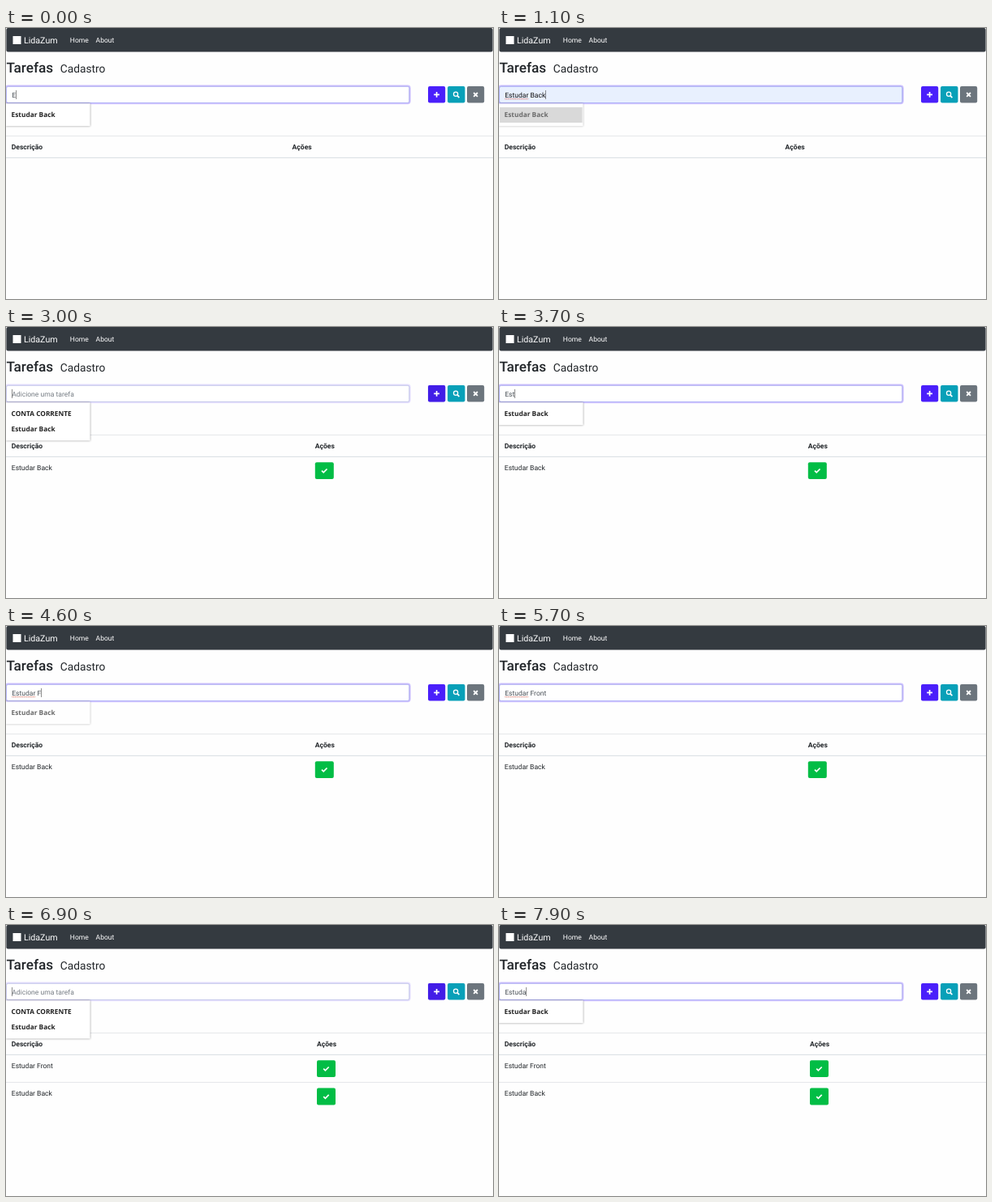
An HTML page for the animation above (8000 ms loop, 600 by 335 pixels).

```html
<!DOCTYPE html>
<html lang="pt">
<head>
<meta charset="utf-8">
<title>Tarefas</title>
<style>
html, body { margin: 0; width: 100%; height: 100%; overflow: hidden; background: #fefefe; }
svg { display: block; width: 600px; height: 335px; }
text { font: 8.55px Roboto, sans-serif; fill: #212529; white-space: pre; text-rendering: geometricPrecision; }
.nav { fill: #fff; }
.brand { font-size: 10.65px; }
.title { font-size: 17.2px; font-weight: 500; }
.sub { font-size: 13.75px; }
.head { font-weight: 700; }
.hint { fill: #757c83; }
.option { font: 600 8.3px "Noto Sans", sans-serif; fill: #222; }
.icon { fill: none; stroke: #fff; stroke-width: 1.7; }
.rule { stroke: #e5e7ea; }
.rule.strong { stroke: #dee2e6; stroke-width: 1.2; }
#popup { filter: drop-shadow(0 .7px .8px #0007); }
</style>
</head>
<body>
<svg viewBox="0 0 600 335">
  <defs>
    <g id="done">
      <rect width="23" height="20.8" rx="2" fill="#02bd45"/>
      <path class="icon" d="M8.2 10.5l2.2 2.2 4.3-4.4"/>
    </g>
  </defs>
  <rect x=".4" width="599.2" height="29.4" rx="2" fill="#343a40"/>
  <rect x="8.5" y="10" width="10" height="10" fill="#fff"/>
  <text class="nav brand" x="22" y="18.7">LidaZum</text>
  <text class="nav" x="78.8" y="18">Home</text>
  <text class="nav" x="110.6" y="18">About</text>
  <text class="title" x=".5" y="55.2">Tarefas</text>
  <text class="sub" x="66.8" y="55.2">Cadastro</text>

  <rect x=".5" y="72.3" width="496.3" height="20.2" rx="2" fill="#fff" stroke="#ced4da" stroke-width=".8"/>
  <rect id="fill" x=".5" y="72.3" width="496.3" height="20.2" rx="2" fill="#e8f0fe" stroke="#bcd3e6" stroke-width=".8"/>
  <g id="focus" fill="none">
    <rect x="-.4" y="71.4" width="498.1" height="22" rx="2.8" stroke="#4a1ffb" stroke-opacity=".27" stroke-width="1.8"/>
    <rect x=".5" y="72.3" width="496.3" height="20.2" rx="2" stroke="#b0b2fb" stroke-width=".8"/>
  </g>
  <text id="hint" class="hint" x="7.2" y="86">Adicione uma tarefa</text>
  <text id="field" x="7.2" y="86"></text>
  <path id="spell" fill="none" stroke="#d0442f" stroke-width=".7" stroke-dasharray="1.2 .6"/>
  <rect id="caret" y="77" width=".6" height="11" fill="#444"/>

  <rect id="ring" x="519" y="71" width="23.2" height="22.6" rx="3" fill="#4a1ffb" fill-opacity=".45"/>
  <rect x="520" y="72" width="21.2" height="20.5" rx="2" fill="#4a1ffb"/>
  <rect id="press" x="520" y="72" width="21.2" height="20.5" rx="2" fill="#391bd3"/>
  <path class="icon" stroke-width="2" d="M527.2 82.4h6.8M530.6 79v6.8"/>
  <rect x="544" y="72" width="21.5" height="20.5" rx="2" fill="#08a0b8"/>
  <circle class="icon" cx="554.1" cy="81.7" r="2.6" style="stroke-width:1.3"/>
  <path class="icon" d="M556 83.7l2.4 2.4"/>
  <rect x="568" y="72" width="21.2" height="20.5" rx="2" fill="#6c757d"/>
  <path class="icon" d="M576.2 80l4.8 4.8m0-4.8l-4.8 4.8" style="stroke-width:1.9"/>

  <path class="rule" d="M0 133.5H600"/>
  <path class="rule strong" d="M0 160.4H600"/>
  <text class="head" x="6.8" y="150">Descrição</text>
  <text class="head" id="actions" y="150">Ações</text>
  <g id="row1">
    <text id="first" x="6.8" y="177.2"></text>
    <use id="done1" href="#done" y="167.2"/>
  </g>
  <g id="row2">
    <path class="rule" d="M0 194.5H600"/>
    <text x="6.8" y="211.3">Estudar Back</text>
    <use id="done2" href="#done" y="201.6"/>
  </g>

  <g id="popup">
    <rect id="panel" y="93.3" width="103.6" fill="#fff"/>
    <rect id="mark" x="1" y="98" width="101.6" height="19" fill="#c8c8c8"/>
    <text class="option" id="account" x="6.6" y="110">CONTA CORRENTE</text>
    <text class="option" id="saved" x="6.6">Estudar Back</text>
  </g>
</svg>
<script>
const LOOP = 8000, FRAME = 100, BACK = 'Estudar Back', FRONT = 'Estudar Front';

// One round per task: focus the field, type in bursts of [start, gap, keys],
// maybe pick the suggestion, let the popup close, go idle, click "+".
const rounds = [
  { focus: -1000, bursts: [[0, 100, 2]], pick: 700, close: 1100, idle: 1700, click: 2200 },
  { focus: 3000, bursts: [[3300, 200, 3], [4100, 100, 9], [5100, 100, 1]],
    pick: Infinity, close: 4600, idle: 5700, click: 6000 },
  { focus: 6900, bursts: [[7100, 200, 4], [7900, 0, 2]],
    pick: Infinity, close: Infinity, idle: Infinity, click: Infinity },
];

const $ = id => document.getElementById(id);
const set = (id, name, value) => $(id).setAttribute(name, value);
const alpha = (id, value) => set(id, 'opacity', +value);
// Linear fade whose first visible step falls on `start`.
const ramp = (t, start, frames) => Math.min(1, Math.max(0, ((t - start) / FRAME + 1) / frames));

const keysIn = (t, [start, gap, keys]) =>
  t < start ? 0 : gap ? Math.min(keys, 1 + Math.floor((t - start) / gap)) : keys;

function textAt(t, { bursts, pick, click }) {
  if (t >= click + 300) return '';
  if (t >= pick) return BACK;
  return FRONT.slice(0, bursts.reduce((sum, burst) => sum + keysIn(t, burst), 0));
}

function draw(t) {
  const round = rounds.findLast(r => r.focus <= t);
  const { focus, pick, close, idle, click } = round;
  const text = textAt(t, round), field = $('field');
  const rise = ramp(t, focus, 2), press = ramp(t, click, 3);
  const preview = t >= pick && t < close;
  const picked = text ? ramp(t, pick, 2) : 0;
  const pressed = press + 1 - rise;

  field.textContent = text;
  field.style.fill = picked ? '#111' : '#495057';
  set('caret', 'x', 7.2 + (text ? field.getComputedTextLength() : 0));
  alpha('caret', t < idle && !preview);
  alpha('hint', !text);
  alpha('fill', picked);
  alpha('focus', rise - press);
  alpha('press', pressed);
  alpha('ring', pressed ** 3);

  const spelled = text.includes(' ') && !preview && t < click;
  alpha('spell', spelled);
  if (spelled) set('spell', 'd', `M7.2 87.7h${field.getSubStringLength(0, 7)}`);

  const count = rounds.filter(r => t >= r.click + 300).length;
  const x = [352.6, 380.8, 383][count];
  for (const id of ['actions', 'done1', 'done2']) set(id, 'x', x);
  $('first').textContent = count > 1 ? FRONT : BACK;
  alpha('row1', count > 0);
  alpha('row2', count > 1);

  alpha('popup', 1 - ramp(t, close, 3));
  alpha('mark', picked);
  alpha('account', !text);
  set('panel', 'height', text ? 28 : 47.2);
  set('saved', 'y', text ? 110 : 129.4);
}

const origin = performance.now();
function tick() {
  const t = (performance.now() - origin) % LOOP;
  draw(Math.floor(t / FRAME) * FRAME);
  requestAnimationFrame(tick);
}
tick();
</script>
</body>
</html>
```
